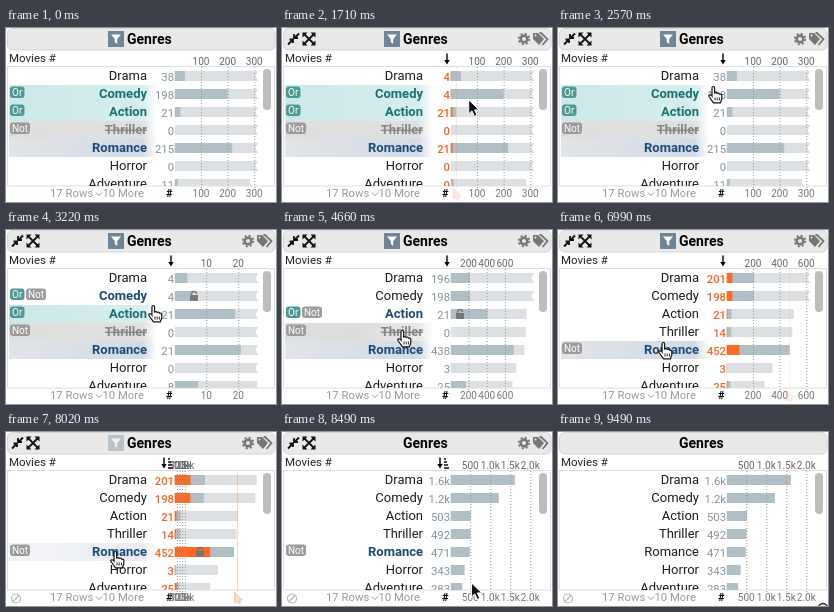
An HTML page for the animation above (9.59 s loop, 270 by 174 pixels).

```html
<!DOCTYPE html>
<html lang="en">
<head>
<meta charset="utf-8">
<title>Genres facet</title>
<style>
html, body { margin: 0; width: 100%; height: 100%; overflow: hidden; background: #fff; }
svg { display: block; width: 270px; height: 174px; font-family: Roboto, sans-serif; }
</style>
</head>
<body>
<svg viewBox="0 0 270 174" id="stage">
  <defs>
    <clipPath id="list"><rect x="1" y="39" width="268" height="119"/></clipPath>
    <linearGradient id="teal"><stop offset="0" stop-color="#cbe8e8"/><stop offset=".9" stop-color="#d6eeee"/><stop offset="1" stop-color="#fff"/></linearGradient>
    <linearGradient id="blue"><stop offset="0" stop-color="#e1e4e8"/><stop offset=".9" stop-color="#d2dbe4"/><stop offset="1" stop-color="#fff"/></linearGradient>
    <linearGradient id="pale"><stop offset="0" stop-color="#f3f4f6"/><stop offset=".9" stop-color="#e9edf1"/><stop offset="1" stop-color="#fff"/></linearGradient>
    <linearGradient id="grey"><stop offset="0" stop-color="#dedede"/><stop offset=".9" stop-color="#e0e0e0"/><stop offset="1" stop-color="#fff"/></linearGradient>
    <linearGradient id="hover"><stop offset="0" stop-color="#dedede"/><stop offset=".5" stop-color="#dcdcdc"/><stop offset=".9" stop-color="#e9e9e9"/><stop offset="1" stop-color="#fff"/></linearGradient>
  </defs>
  <rect x="1.500" y=".5" width="267.500" height="21.500" rx="5" fill="#e9e9e9" stroke="#d4d4d4"/>
  <rect x="1.500" y="38.500" width="267" height="119.500" fill="none" stroke="#dedede"/>
  <text x="121" y="16" font-size="14" font-weight="700">Genres</text>
  <text x="3" y="34" font-size="11.500" fill="#222">Movies #</text>
  <g fill="#999" font-size="11.300">
    <text x="44" y="169">17 Rows</text><text x="96.500" y="169">10 More</text>
    <path d="M90 164.500l3 3 3-3" fill="none" stroke="#999"/>
  </g>
  <text x="160" y="169" font-size="11" font-weight="700">#</text>
  <g id="scene"></g>
</svg>
<script>
const LOOP = 9590, X0 = 168.8, AXIS = 80, CAP = 83.5, ROW = 18;
const names = ['Drama', 'Comedy', 'Action', 'Thriller', 'Romance', 'Horror', 'Adventure'];
const totals = [1600, 1200, 503, 492, 471, 343, 283];
const phases = [
  { at: 0, max: 300, step: 100, n: [38, 198, 21, 0, 215, 0, 11] },
  { at: 2750, max: 25, step: 10, n: [4, 4, 21, 0, 21, 0, 8] },
  { at: 4370, max: 600, step: 200, n: [196, 198, 21, 0, 438, 3, 25] },
  { at: 5840, max: 600, step: 200, n: [204, 204, 35, 33, 471, 3, 27] },
  { at: 7910, max: 2000, step: 500, n: totals }
];
// Orange counts while a row is hovered; the marker sits at that row's value
const previews = [
  { from: 1560, leave: 1950, to: 2200, max: 300, value: 21, n: [4, 4, 21, 0, 21, 0, 0] },
  { from: 6870, leave: 7910, to: 8160, max: 600, value: 471, n: [201, 198, 21, 14, 452, 3, 25] }
];
const locks = [
  { from: 2750, to: 3730, x: 188, row: 1, open: true },
  { from: 4370, to: 5300, x: 178, row: 2, open: true },
  { from: 7910, to: 8300, x: 194, row: 4 }
];
// Per row: start time, text style, background, badges
const looks = {
  Comedy: [[0, 'or', 'teal', 'Or'], [2750, 'and', '', 'Or Not'], [3400, '', '', '']],
  Action: [[0, 'or', 'teal', 'Or'], [4370, 'and', '', 'Or Not'], [4900, '', '', '']],
  Thriller: [[0, 'not', 'grey', 'Not'], [4600, 'not', 'hover', 'Not'], [5840, 'and', 'hover', 'Or Not'], [6200, '', '', '']],
  Romance: [[0, 'and', 'blue', ''], [6870, 'and', 'blue', 'Not'], [7910, 'and', 'pale', 'Not'], [8150, 'and', '', 'Not'], [8950, '', '', '']]
};
const styles = {
  '': 'fill="#1c1c1c"',
  or: 'fill="#17716f" font-weight="700"',
  and: 'fill="#1b4a78" font-weight="700"',
  not: 'fill="#858585" font-weight="700" text-decoration="line-through"'
};
const path = [
  [900, 266, 176], [1250, 238, 132], [1710, 187, 72], [1830, 150, 58], [2800, 150, 58], [3220, 142, 75],
  [3670, 115, 70], [4400, 115, 70], [4660, 115, 100], [5300, 113, 101], [5840, 113, 101],
  [6010, 104, 106], [6750, 100, 112], [7500, 100, 112], [7730, 104, 119], [8080, 104, 119], [8840, 262, 178]
];

const scene = document.getElementById('scene');
const clamp = v => Math.max(0, Math.min(1, v));
const ease = v => (1 - Math.cos(Math.PI * clamp(v))) / 2;
const mix = (a, b, p) => a + (b - a) * p;
const latest = (list, t, time) => list.filter(s => time(s) <= t).pop();
const active = (list, t) => list.find(s => t >= s.from && t < s.to);
const text = (x, y, size, str, attrs = '') => `<text x="${x}" y="${y}" font-size="${size}" ${attrs}>${str}</text>`;
const rect = (x, y, w, h, fill, rx = 0) => w > 0 ? `<rect x="${x}" y="${y}" width="${w}" height="${h}" rx="${rx}" fill="${fill}"/>` : '';
const count = n => n < 1000 ? n : (n / 1000).toFixed(1) + 'k';
const presence = (s, t) => ease((t - s.from) / 400) * (1 - ease((t - s.leave) / 250));

function badges(list, top) {
  let x = 4;
  return list.split(' ').filter(Boolean).map(word => {
    const w = word === 'Or' ? 14.5 : 20;
    const out = rect(x, top + 1.5, w, 11.5, word === 'Or' ? '#4b9896' : '#9a9a9a', 3)
      + text(x + w / 2, top + 11, 10, word, 'fill="#fff" text-anchor="middle"');
    x += w + 1.5;
    return out;
  }).join('');
}

function axis(phase, p) {
  let out = '';
  for (let v = phase.step; v <= phase.max; v += phase.step) {
    const x = X0 + v / phase.max * AXIS * p;
    out += `<path d="M${x} 39V160" stroke="#999" stroke-dasharray="1 2"/>`
      + text(x - .5, 36.5, 10, count(v), 'fill="#666" text-anchor="middle"')
      + text(x - .5, 169, 10, count(v), 'fill="#777" text-anchor="middle"');
  }
  return out;
}

function track(w, y) {
  if (w < CAP - .5) return rect(X0, y, w, 10, '#dce0e3');
  return `<path d="M${X0} ${y}h${w}l-3 5 3 5h${-w}z" fill="#dce0e3"/>`;
}

function rows(t, phase, prev, p, preview) {
  let labels = '', bars = '';
  names.forEach((name, i) => {
    const top = 39 + i * ROW, y = top + 4;
    const [, style, bg, tags] = latest(looks[name] || [[0, '', '', '']], t, s => s[0]);
    const width = pick => {
      const px = s => Math.min(CAP, pick(s) * AXIS / s.max);
      return mix(px(prev), px(phase), p);
    };
    if (bg) labels += rect(3, top, 148, ROW, `url(#${bg})`);
    labels += badges(tags, top) + text(141, top + 13.3, 13, name, `text-anchor="end" ${styles[style]}`);
    labels += text(168, top + 13.5, 11.3, count((preview || phase).n[i]),
      `text-anchor="end" ${preview ? 'fill="#f26522" font-weight="500"' : 'fill="#84929b"'}`);
    bars += track(width(() => totals[i]), y) + rect(X0, y, width(s => s.n[i]), 10, '#b0bec5');
    if (preview) bars += rect(X0, y, preview.n[i] * AXIS / preview.max * presence(preview, t), 10, '#ff6a21');
  });
  return labels + bars;
}

function lock(t) {
  const l = active(locks, t);
  if (!l) return '';
  const y = 39 + l.row * ROW + 9;
  return rect(l.x - 4, y - 1, 8, 6, '#777', 1)
    + `<path d="M${l.x - 2.5} ${y}v-2a2.500 2.500 0 0 1 5 0${l.open ? '' : 'v1'}" fill="none" stroke="#777" stroke-width="1.500"/>`;
}

const funnel = opacity => `<g opacity="${opacity}">${rect(102, 3, 16, 16, '#6d8596')}
  <path d="M105 6.500h10l-3.800 4.500v5l-2.400-2v-3z" fill="#fff"/></g>`;

const tools = (opacity, sorted) => `<g opacity="${opacity}">
  <path d="M6 16.500l4-4m3-3l4-4M7.500 11.500h3.500v3.500M12 6v4h4" fill="none" stroke="#111" stroke-width="1.800"/>
  <path d="M22 6l10 10m0-10l-10 10" stroke="#111" stroke-width="1.800"/>
  <path d="M20.500 4.500h5l-5 5zm13 0h-5l5 5zm-13 13h5l-5-5zm13 0h-5l5-5z" fill="#111"/>
  <circle cx="242" cy="11" r="3.300" fill="none" stroke="#777" stroke-width="2.500"/>
  <circle cx="242" cy="11" r="5.300" fill="none" stroke="#777" stroke-width="1.800" stroke-dasharray="2.080 2.080"/>
  <path d="M251 5h5l6 6-5 6-6-6z" fill="#777"/><path d="M257.500 5h1.500l6.500 6-5 6" fill="none" stroke="#777" stroke-width="1.800"/>
  <circle cx="253.500" cy="7.500" r="1" fill="#e9e9e9"/>
  <g transform="translate(${sorted ? -7 : 0} 0)"><path d="M165 25.500v8" stroke="#111" stroke-width="1.500"/><path d="M162.300 32h5.400l-2.700 4.500z"/>
  ${sorted ? '<path d="M169 27h2m-2 3h3m-3 3h4m-4 3h5" stroke="#111" stroke-width="1.300"/>' : ''}</g></g>`;

const arrow = '<path d="M0 0v14l3.300-3 2.500 5.500 2.500-1.100-2.400-5.400h4.500z" fill="#111" stroke="#fff"/>';
const hand = `<path d="M4 10V2q0-1.500 1.300-1.500T6.600 2v5q2-1 2.600.5 2-.8 2.400.7 2-.5 2.200 1.200v3.500l-1.500 4H5.500L1 10.500q-.6-1.500.8-1.700T4 10z"
  fill="#fff" stroke="#111" stroke-width="1.200"/><path d="M7 11.500v3m2.200-3v3m2.200-3v3" stroke="#111" stroke-width=".9"/>`;

function cursor(t) {
  if (t >= 9490) return '<circle cx="265" cy="176" r="4.500" fill="none" stroke="#222" stroke-width="1.300"/>';
  const k = path.findIndex(s => s[0] > t);
  if (k < 1) return '';
  const [t0, x0, y0] = path[k - 1], [t1, x1, y1] = path[k], p = (t - t0) / (t1 - t0);
  const x = mix(x0, x1, p);
  return `<g transform="translate(${x} ${mix(y0, y1, p)})">${x > 152 ? arrow : hand}</g>`;
}

function marker(preview, t) {
  if (!preview) return '';
  const x = X0 + preview.value * AXIS / preview.max;
  return `<g opacity="${presence(preview, t) * .8}"><path d="M${x} 39V160" stroke="#ff7a45" opacity=".7"/>
    <path d="M${x - 3} 160v11l2.500-2 1.500 3 2-1-1.300-3h3z" fill="#ffb092" stroke="#ff7a45"/></g>`;
}

function draw(t) {
  const phase = latest(phases, t, s => s.at);
  const prev = phases[Math.max(0, phases.indexOf(phase) - 1)];
  const preview = active(previews, t);
  const since = t - phase.at;
  const spread = phase.max === prev.max ? 1 : ease(since / 470);
  const shown = Math.min(clamp((t - 950) / 200), clamp((9070 - t) / 180));
  const cleared = t >= 7910;
  scene.innerHTML = `<g clip-path="url(#list)">${rows(t, phase, prev, ease(since / 600), preview)}</g>`
    + axis(phase, spread)
    + rect(257, 41, 8, 41, '#bdbdbd', 4)
    + lock(t) + funnel(1 - clamp((t - 7910) / 180)) + tools(shown, cleared)
    + (cleared ? '<path d="M6.500 170l7-7M14.500 166.500a4.500 4.500 0 1 1-9 0 4.500 4.500 0 1 1 9 0" fill="none" stroke="#b5b5b5" stroke-width="1.200"/>' : '')
    + marker(preview, t) + cursor(t);
}

const start = performance.now();
function tick() {
  draw((performance.now() - start) % LOOP);
  requestAnimationFrame(tick);
}
tick();
</script>
</body>
</html>
```
